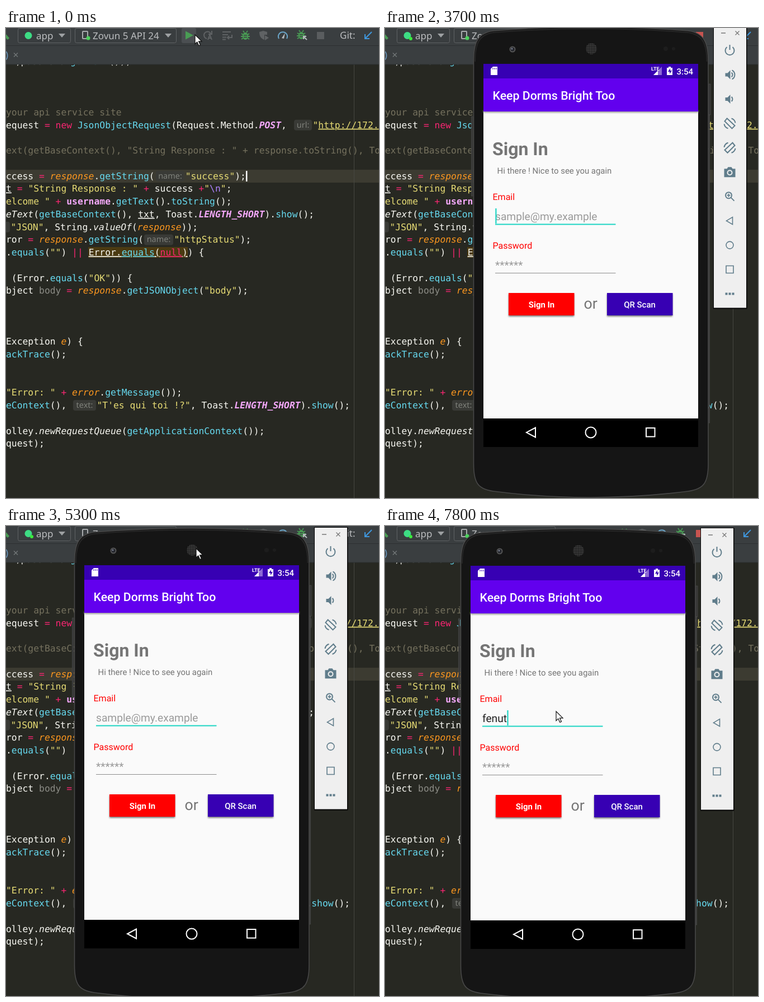
An HTML page for the animation above (8000 ms loop, 667 px wide and 839 px high).

```html
<!DOCTYPE html>
<html lang="en">
<head>
<meta charset="utf-8">
<title>Running an app from the editor</title>
<style>
html, body { margin: 0; width: 100%; height: 100%; overflow: hidden; background: #272822; }
svg { display: block; width: 100vw; height: 100vh; text-rendering: geometricPrecision; }
text { white-space: pre; }
.code { font: 16.35px "DejaVu Sans Mono", monospace; }
.ui { font: 17px "Noto Sans", sans-serif; fill: #bbbdbf; }
.hint { font: 14.5px "Noto Sans", sans-serif; fill: #7f817b; }
.app { font-family: Roboto, sans-serif; }
.w { fill: #f8f8f2; } .k { fill: #f92672; } .m { fill: #66d9ef; } .s { fill: #e6db74; }
.c { fill: #75715e; } .g { fill: #8b8b85; } .p { fill: #ae81ff; }
.o { fill: #fd971f; font-style: italic; }
.i { fill: #f8f8f2; font-style: italic; }
.b { fill: #f5a9fb; font-weight: bold; }
.bi { fill: #f5a9fb; font-weight: bold; font-style: italic; }
.under { text-decoration: underline; }
.line { fill: none; stroke-width: 2; }
</style>
</head>
<body>
<svg viewBox="0 0 667 839">
  <defs>
    <pattern id="mesh" width="3" height="3" patternUnits="userSpaceOnUse">
      <rect width="3" height="3" fill="#191919"/><circle cx="1.5" cy="1.5" r="1" fill="#555"/>
    </pattern>
    <filter id="soft" x="-10%" y="-20%" width="120%" height="150%"><feGaussianBlur stdDeviation="1.5"/></filter>
    <g id="bug">
      <path d="M-7-3l3 2M7-3l-3 2M-8 2h16M-7 7l3-2M7 7l-3-2M-4-8l2 3M4-8l-2 3" stroke="#499c54" stroke-width="1.8"/>
      <ellipse cy="1.5" rx="5" ry="6.5" fill="#499c54"/>
      <path d="M-3 0h6M-3 3.500h6" stroke="#3c3f41" stroke-width="1.4"/>
    </g>
  </defs>

  <rect width="667" height="839" fill="#272822"/>
  <rect y="253" width="667" height="23" fill="#3c3b31"/>
  <path d="M622.5 65V839" stroke="#464741"/>
  <rect x="147" y="391" width="178" height="19" fill="#4b3a12"/>
  <g id="code" class="code"></g>
  <rect id="editorCaret" x="429" y="255" width="2.500" height="19" fill="#fff"/>

  <!-- toolbar -->
  <rect width="667" height="65" fill="#3a3e40"/>
  <path d="M0 31.500H667M0 65H667" stroke="#2d3032"/>
  <path id="hammer" d="M0 11l6 7-3 3-3-3z"/>
  <g fill="#393d3f" stroke="#606365">
    <rect x="21.500" y="0.500" width="94" height="26" rx="3"/>
    <rect x="123.500" y="0.500" width="181" height="26" rx="3"/>
  </g>
  <circle cx="40" cy="13.500" r="6.500" fill="#3ddc84"/>
  <circle id="runningDot" cx="46" cy="19" r="3" fill="#3bea3b"/>
  <path d="M94 10h12l-6 7zM284 10h12l-6 7z" fill="#9da0a2"/>
  <rect x="137" y="6" width="9" height="13" rx="1" class="line" stroke="#a9acae"/>
  <circle cx="147" cy="18" r="3.500" fill="#4bd15c"/>
  <g class="ui">
    <text x="54" y="19.500">app</text>
    <text x="155" y="19.500">Zovun 5 API 24</text>
    <text x="597" y="18.500">Git:</text>
    <text x="-1" y="54" style="fill:#6f9fc8">)</text>
  </g>
  <path d="M14 44.500l7 7m0-7l-7 7" stroke="#74787a" stroke-width="1.300"/>
  <rect id="hover" x="314" y="0" width="26" height="27" rx="3" fill="#4b4f52"/>
  <path id="run" d="M321 5.500L335 13 321 20.500z" fill="#499c54"/>
  <g id="rerun">
    <path d="M327 19.500A6.300 6.300 0 1 1 332 10" class="line" stroke="#499c54" stroke-width="2.200"/>
    <path d="M335 5v7h-7z" fill="#499c54"/><rect x="328.500" y="14" width="7" height="7" fill="#499c54"/>
  </g>
  <g stroke="#5f6264" class="line">
    <path d="M359 19A6.300 6.300 0 1 1 366 10M368 5v6h-6M361 21l3.500-9 3.500 9m-6-3h5"/>
    <path d="M387 7h15M387 12h10M387 16.500h7M387 20.500h6M404 12v5h-7m2-3l-3 3 3 3"/>
  </g>
  <path d="M453 7l7-2 7 2v5h-5v9c-6-2-9-6-9-14zM463 13l7 4.500-7 4.500z" fill="#5f6264"/>
  <use href="#bug" x="428" y="13"/>
  <path d="M488 19a8 8 0 1 1 14 0" class="line" stroke="#6ba6c9" stroke-width="2.500"/>
  <path d="M493 18l6-9-2 10z" fill="#b6babd"/>
  <use href="#bug" x="528" y="12"/>
  <path d="M538 21l-6-6m0 5v-5h5" class="line" stroke="#b6babd"/>
  <rect id="stop" x="556" y="7" width="13" height="13"/>
  <path d="M654 7L642 19m0-8v8h8" class="line" stroke="#3f96dc" stroke-width="2.500"/>

  <!-- emulator window -->
  <g id="emulator">
    <path d="M157 158h-2.500V300h2.500zM579 100h3v55h-3zM579 155h1.500V705h-1.500z" fill="#333" stroke="#555" stroke-width=".6"/>
    <path d="M158.500 60C158.500 28 164 9 194 5Q368-9 542 5C572 9 578 28 578 60V778C578 812 570 823 542 827Q368 849 194 827C166 823 158.500 812 158.500 778Z" fill="#151515" stroke="#484848" stroke-width="1.600"/>
    <path d="M161 60C161 30 167 12 194 8Q368-6 542 8C569 12 575.500 30 575.500 60" class="line" stroke="#262626"/>
    <circle cx="228" cy="38" r="5.500" fill="#555"/><circle cx="228" cy="38" r="3.500" fill="#23252c"/>
    <circle cx="227" cy="37" r="1.500" fill="#7b8190"/>
    <circle cx="369" cy="37" r="10" fill="url(#mesh)"/>
    <circle cx="502" cy="37" r="4" fill="#1d1d1d"/><circle cx="516" cy="37" r="3" fill="#1d1d1d"/>

    <rect x="176" y="64" width="384" height="684" fill="#fafafa"/>
    <rect x="176" y="147" width="384" height="4" fill="#999" filter="url(#soft)"/>
    <rect x="176" y="90" width="384" height="59" fill="#6200ee"/>
    <rect x="176" y="64" width="384" height="26" fill="#3700b3"/>
    <rect x="176" y="697" width="384" height="51"/>
    <path d="M193 69h8v15h-12V73z" fill="#fff"/>
    <path d="M193 71v3M196 71v3M199 71v3" stroke="#3700b3"/>
    <path d="M480 84l15-15v15z" fill="#8b68d4"/><path d="M480 84l8-8v8z" fill="#fff"/>
    <path d="M504 71h3v-2h4v2h3v13h-10z" fill="#fff"/><path d="M510 72l-4 6h3v4l4-6h-3z" fill="#3700b3"/>
    <g class="app">
      <g fill="#fff" font-weight="500">
        <text x="476" y="76" font-size="9" font-weight="700">LTE</text>
        <text x="521.500" y="82.500" font-size="15">3:54</text>
        <text x="192.500" y="127.500" font-size="21.300">Keep Dorms Bright Too</text>
      </g>
      <g fill="#757575">
        <text x="192" y="226.500" font-size="32" font-weight="700">Sign In</text>
        <text x="200.500" y="260" font-size="14.930">Hi there ! Nice to see you again</text>
        <text x="355.500" y="501" font-size="26.700">or</text>
      </g>
      <g fill="#f00" font-size="16">
        <text x="192.500" y="307">Email</text><text x="192.500" y="394">Password</text>
      </g>
      <g font-size="19.200" fill="#9a9a9a">
        <text id="placeholder" x="197" y="343">sample@my.example</text>
        <text x="197" y="430">******</text>
        <text id="typed" x="197" y="343" fill="#212121"></text>
      </g>
      <path d="M197 350.500h215.500" stroke="#1fd5c4" stroke-width="2"/>
      <path d="M197 437.500h215.500" stroke="#8d8d8d"/>
      <rect id="fieldCaret" y="322" width="2.200" height="27" fill="#1fd5c4"/>
      <path d="M221 475h117v40H221zM397 475h117v40H397z" fill="#777" filter="url(#soft)"/>
      <rect x="221" y="473" width="117.500" height="40" fill="#f00"/>
      <rect x="397" y="473" width="117.500" height="40" fill="#3700b3"/>
      <g fill="#fff" font-size="14.930" text-anchor="middle">
        <text x="280" y="499" font-weight="700">Sign In</text>
        <text x="455.500" y="499" font-weight="500">QR Scan</text>
      </g>
    </g>
    <path d="M269 713.500v17L253 722zM467 714h15.500v15.500H467z" class="line" stroke="#fff"/>
    <circle cx="368" cy="722" r="9.500" class="line" stroke="#fff"/>

    <rect x="587" y="-4" width="60.500" height="505.500" fill="#050505"/>
    <rect x="588" y="-3" width="58" height="502.500" fill="#efefef"/>
    <path d="M601 9h8M626.500 5.500l7 7m0-7l-7 7" stroke="#777" stroke-width="1.300"/>
    <g id="controls" class="line" stroke="#607d8b"></g>
  </g>

  <path id="cursor" d="M0 0v16.500l3.800-3.600 3 6.600 2.700-1.200-3-6.500H12z" fill="#fff" stroke="#111" stroke-width="1.200"/>
</svg>
<script>
const LOOP = 8000;
const $ = id => document.getElementById(id);
const escapeText = s => s.replace(/&/g, '&amp;').replace(/</g, '&lt;');

// [row, x, segments]: each segment opens with its style letter; a capital underlines it.
const codeRows = [
  [-9, -3, 'w r,password.¦mgetText¦w());'],
  [-5, 0, 'cyour api service site'],
  [-4, 0, 'wequest ¦k= new ¦mJsonObjectRequest¦w(Request.Method.¦xPOST¦w,'],
  [-4, 548.5, 's"¦Shttp://172.'],
  [-2, 0, 'cext(getBaseContext(), "String Response : " + response.toString(), To'],
  [0, 0, 'wccess ¦k= ¦oresponse¦w.¦mgetString¦w('],
  [0, 320.7, 's"success"¦w);'],
  [1, 0, 'Wt¦k = ¦s"String Response : "¦k + ¦wsuccess ¦k+¦s"¦p\\n¦s"¦w;'],
  [2, 0, 'selcome "¦k + ¦busername¦w.¦mgetText¦w().¦mtoString¦w();'],
  [3, 0, 'ieText¦w(¦mgetBaseContext¦w(), ¦Wtxt¦w, Toast.¦xLENGTH_SHORT¦w).¦mshow¦w();'],
  [4, 8.5, 's"JSON"¦w, String.¦ivalueOf¦w(¦oresponse¦w));'],
  [5, 0, 'wror ¦k= ¦oresponse¦w.¦mgetString¦w('],
  [5, 300.5, 's"httpStatus"¦w);'],
  [6, 0, 'w.¦mequals¦w(¦s""¦w) ¦k||¦w ¦WError.¦Mequals¦W(¦Knull¦W)¦w) {'],
  [8, 0, 'w (Error.¦mequals¦w(¦s"OK"¦w)) {'],
  [9, 0, 'wbject ¦gbody ¦k= ¦oresponse¦w.¦mgetJSONObject¦w(¦s"body"¦w);'],
  [13, 0, 'wException ¦oe¦w) {'],
  [14, 0, 'mackTrace¦w();'],
  [17, 0, 's"Error: "¦k + ¦oerror¦w.¦mgetMessage¦w());'],
  [18, 0, 'meContext¦w(),'],
  [18, 162.5, 's"T\'es qui toi !?"¦w, Toast.¦xLENGTH_SHORT¦w).¦mshow¦w();'],
  [20, 0, 'wolley.¦inewRequestQueue¦w(¦mgetApplicationContext¦w());'],
  [21, 0, 'wquest);'],
];
// [row, x, width, label]
const hints = [
  [-4, 515, 32, 'url:'], [0, 268, 51, 'name:'], [4, -34, 41, 'tag:'],
  [5, 247, 52, 'name:'], [18, 120, 41, 'text:'],
];
const baseline = row => 269.7 + 22.74 * row;

const segment = s => {
  const key = s[0].toLowerCase();
  const style = (key === 'x' ? 'bi' : key) + (s[0] === key ? '' : ' under');
  return `<tspan class="${style}">${escapeText(s.slice(1))}</tspan>`;
};
$('code').innerHTML =
  codeRows.map(([row, x, s]) =>
    `<text x="${x}" y="${baseline(row)}">${s.split('¦').map(segment).join('')}</text>`).join('') +
  hints.map(([row, x, w, label]) =>
    `<rect x="${x}" y="${baseline(row) - 15}" width="${w}" height="19" rx="4" fill="#393a36"/>
     <text class="hint" x="${x + w / 2}" y="${baseline(row) - 1}" text-anchor="middle">${label}</text>`).join('');

// Emulator side buttons, drawn around their own centre.
const solid = 'fill="#607d8b" stroke="none"';
const speaker = `<path ${solid} d="M-8-3h4l5-5v16l-5-5h-4z"/>`;
const tilted = '<path d="M-5-9L9 4 4 9-9-4z"/>';
const controls = [
  '<path d="M-5-6a8 8 0 1 0 10 0M0-10v9"/>',
  speaker + '<path d="M3-4a5 5 0 0 1 0 8M4-8a9 9 0 0 1 0 16"/>',
  speaker + '<path d="M3-4a5 5 0 0 1 0 8"/>',
  tilted + '<path d="M3-9q6 2 7 8M-3 9q-6-2-7-8"/>',
  `<g transform="scale(-1 1)">${tilted}<path d="M3-9q6 2 7 8M-3 9q-6-2-7-8"/></g>`,
  `<path ${solid} d="M-10-6h5l2-3h6l2 3h5V9h-20z"/><circle cy="1" r="4" stroke="#efefef"/>`,
  '<circle cx="-2" cy="-2" r="5.500"/><path d="M2 2l6 6M-5-2h6M-2-5v6" stroke-width="1.800"/>',
  '<path d="M5-6.500v13L-6 0z" stroke-width="1.600"/>',
  '<circle r="6.500" stroke-width="1.600"/>',
  '<path d="M-6.500-6.500h13v13h-13z" stroke-width="1.600"/>',
  `<path ${solid} d="M-8-2h4v4h-4zM-2-2h4v4h-4zM4-2h4v4h-4z"/>`,
];
$('controls').innerHTML = controls.map((shape, i) =>
  `<g transform="translate(616.500 ${40 + 43.45 * i})">${shape}</g>`).join('');

// Linear path through [time, x, y] points.
function along(points, t) {
  const next = points.findIndex(p => p[0] > t);
  if (next < 0) return points[points.length - 1].slice(1);
  if (next === 0) return points[0].slice(1);
  const [a, b] = [points[next - 1], points[next]];
  const f = (t - a[0]) / (b[0] - a[0]);
  return [a[1] + (b[1] - a[1]) * f, a[2] + (b[2] - a[2]) * f];
}
const cursorTrips = [
  { from: 0, to: 600, path: [[0, 338, 12], [100, 345, 15], [500, 637, 129]] },
  { from: 2900, to: 3300, path: [[2900, 298, 257], [3200, 472, 642]] },
  { from: 4200, to: LOOP, path: [[4200, 472, 800], [4600, 400, 250], [5000, 363, 33], [5100, 363, 34],
    [5300, 340, 40], [5500, 350, 40], [5700, 350, 40], [6100, 318, 270], [6300, 306, 331]] },
];
const windowPath = [[5000, 0, 0], [5100, -6, 1], [5200, -22, 4], [5300, -36, 6],
  [5400, -33, 7], [5500, -26, 7], [5600, -23, 7]];
const word = 'fenut';
const keyTimes = [6800, 7100, 7600, 7700, 7800];

const within = (t, from, to) => t >= from && t < to;
const show = (id, on) => $(id).setAttribute('visibility', on ? 'inherit' : 'hidden');
const move = (id, [x, y]) => $(id).setAttribute('transform', `translate(${x} ${y})`);

function draw(t) {
  show('hover', t < 200);
  $('hammer').setAttribute('fill', within(t, 400, 1000) ? '#5f6264' : '#499c54');
  $('stop').setAttribute('fill', t < 1100 ? '#5a5d5f' : '#c75450');
  show('runningDot', t >= 1100);
  show('run', t < 1500);
  show('rerun', t >= 1500);
  show('editorCaret', t < 1100 || within(t, 1700, 2100) || within(t, 2900, 3300));

  show('emulator', t >= 3700);
  move('emulator', along(windowPath, t));

  const count = keyTimes.filter(k => t >= k).length;
  $('typed').textContent = word.slice(0, count);
  show('placeholder', t >= 3700 && count === 0);
  $('placeholder').style.display = count ? 'none' : '';
  $('fieldCaret').setAttribute('x', 197.3 + (count ? $('typed').getComputedTextLength() : 0));
  const blinkOff = within(t, 3900, 4400) || within(t, 4900, 5400) || within(t, 5900, 6300);
  show('fieldCaret', t >= 3700 && !blinkOff);

  const trip = cursorTrips.find(c => within(t, c.from, c.to));
  show('cursor', trip);
  if (trip) move('cursor', along(trip.path, t));
}

const start = performance.now();
function tick() {
  const t = (performance.now() - start) % LOOP;
  draw(Math.floor(t / 100) * 100);
  requestAnimationFrame(tick);
}
tick();
</script>
</body>
</html>
```
